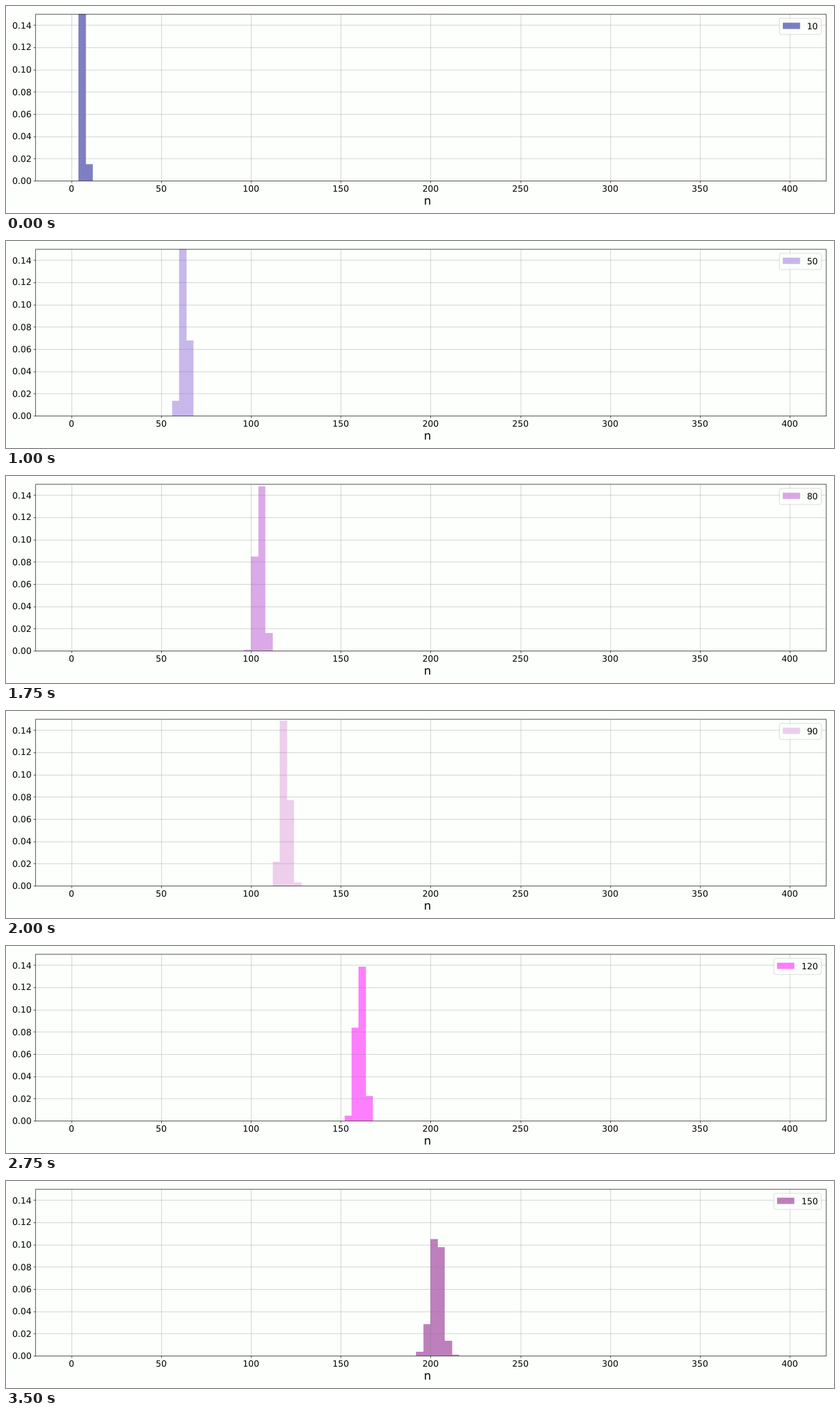
Write an HTML page that moves like this. It is 1280 px wide and 320 px high and loops after 3750 ms.

```html
<!DOCTYPE html>
<html lang="en">
<head>
<meta charset="utf-8">
<title>Histogram</title>
<style>
  html, body { margin: 0; width: 100%; height: 100%; overflow: hidden; background: #fdfffc; }
  svg { display: block; width: 1280px; height: 320px; }
  text { font: 15px "DejaVu Sans", Verdana, sans-serif; fill: #000; text-rendering: geometricPrecision; }
  .grid { stroke: #808080; stroke-opacity: .5; stroke-width: .8; }
  .axis { stroke: #000; stroke-width: .8; fill: none; }
  .end { text-anchor: end; }
  .mid { text-anchor: middle; }
  .name { font-size: 20px; }
</style>
</head>
<body>
<svg viewBox="0 0 1440 360">
  <defs><clipPath id="plot"><rect x="51" y="14" width="1375" height="290.5"/></clipPath></defs>
  <path id="bars" fill-opacity=".5" clip-path="url(#plot)"/>
  <g id="axes"></g>
  <rect class="axis" x="51.5" y="14.5" width="1375" height="290"/>
  <text class="mid name" x="733" y="345">n</text>
  <rect id="box" y="21.5" height="28" rx="3" fill="#fdfffc" fill-opacity=".8" stroke="#ccc" stroke-opacity=".8"/>
  <rect id="swatch" y="29" width="30" height="11" fill-opacity=".5"/>
  <text id="count" y="40"></text>
</svg>
<script>
const STEP = 250, BIN = 4;
const LEFT = 51.32, BOTTOM = 304, LEGEND_RIGHT = 1418, DIGIT = 9.54;
const px = v => LEFT + (v + 20) * 3.1232;
const py = v => BOTTOM - v * 290 / 0.15;
const line = v => Math.round(v) + 0.5;
const el = id => document.getElementById(id);

// fill, first bin, bin densities in thousandths
const steps = [
  ["darkblue", 4, [235, 15]],
  ["mediumblue", 16, [68, 181.5, .5]],
  ["blue", 28, [5, 195, 50]],
  ["slateblue", 44, [72, 171.5, 6.5]],
  ["mediumpurple", 56, [13.5, 169, 67.5]],
  ["blueviolet", 68, [1, 76, 158, 15]],
  ["darkorchid", 84, [19, 158, 72, 1]],
  ["mediumorchid", 96, [1, 85, 148, 16]],
  ["plum", 112, [21.5, 148.5, 77, 3]],
  ["orchid", 124, [2.5, 81, 146, 20]],
  ["violet", 136, [.5, 27.5, 142.5, 76.5, 3]],
  ["magenta", 152, [4.5, 84, 138.5, 22.5]],
  ["#c800c8", 164, [.5, 28.5, 138, 78.5, 4.5]],
  ["darkmagenta", 176, [.5, 7, 78, 129, 34, 1.5]],
  ["purple", 192, [3.5, 28.5, 105, 97.5, 13.5, 1]]
];

function set(node, attrs) {
  for (const key in attrs) node.setAttribute(key, attrs[key]);
}

function add(parent, tag, attrs, text = "") {
  const node = document.createElementNS("http://www.w3.org/2000/svg", tag);
  set(node, attrs);
  node.textContent = text;
  parent.append(node);
}

const axes = el("axes");
for (let v = 0; v <= 400; v += 50) {
  const x = line(px(v));
  add(axes, "path", { class: "grid", d: `M${x} 15V304` });
  add(axes, "path", { class: "axis", d: `M${x} 304.5v3.5` });
  add(axes, "text", { class: "mid", x: px(v), y: 323 }, v);
}
for (let i = 0; i <= 7; i++) {
  const v = i * 0.02, y = line(py(v));
  if (i) add(axes, "path", { class: "grid", d: `M52 ${y}H1426` });
  add(axes, "path", { class: "axis", d: `M51.5 ${y}h-3.5` });
  add(axes, "text", { class: "end", x: 44.3, y: Math.round(py(v) + 5.4) }, v.toFixed(2));
}

function show(index) {
  const [fill, start, densities] = steps[index];
  const edge = i => Math.round(px(start + i * BIN));
  const tops = densities.map((d, i) => `V${Math.round(py(d / 1000))}H${edge(i + 1)}`);
  set(el("bars"), { fill, d: `M${edge(0)} ${BOTTOM}${tops.join("")}V${BOTTOM}Z` });

  const count = String((index + 1) * 10);
  const width = 54 + count.length * DIGIT;
  const left = LEGEND_RIGHT - width;
  set(el("box"), { x: left, width });
  set(el("swatch"), { x: Math.round(left + 6), fill });
  set(el("count"), { x: left + 48 });
  el("count").textContent = count;
}

let current = -1;
function tick() {
  const index = Math.floor(performance.now() / STEP) % steps.length;
  if (index !== current) show(current = index);
  requestAnimationFrame(tick);
}
tick();
</script>
</body>
</html>
```
